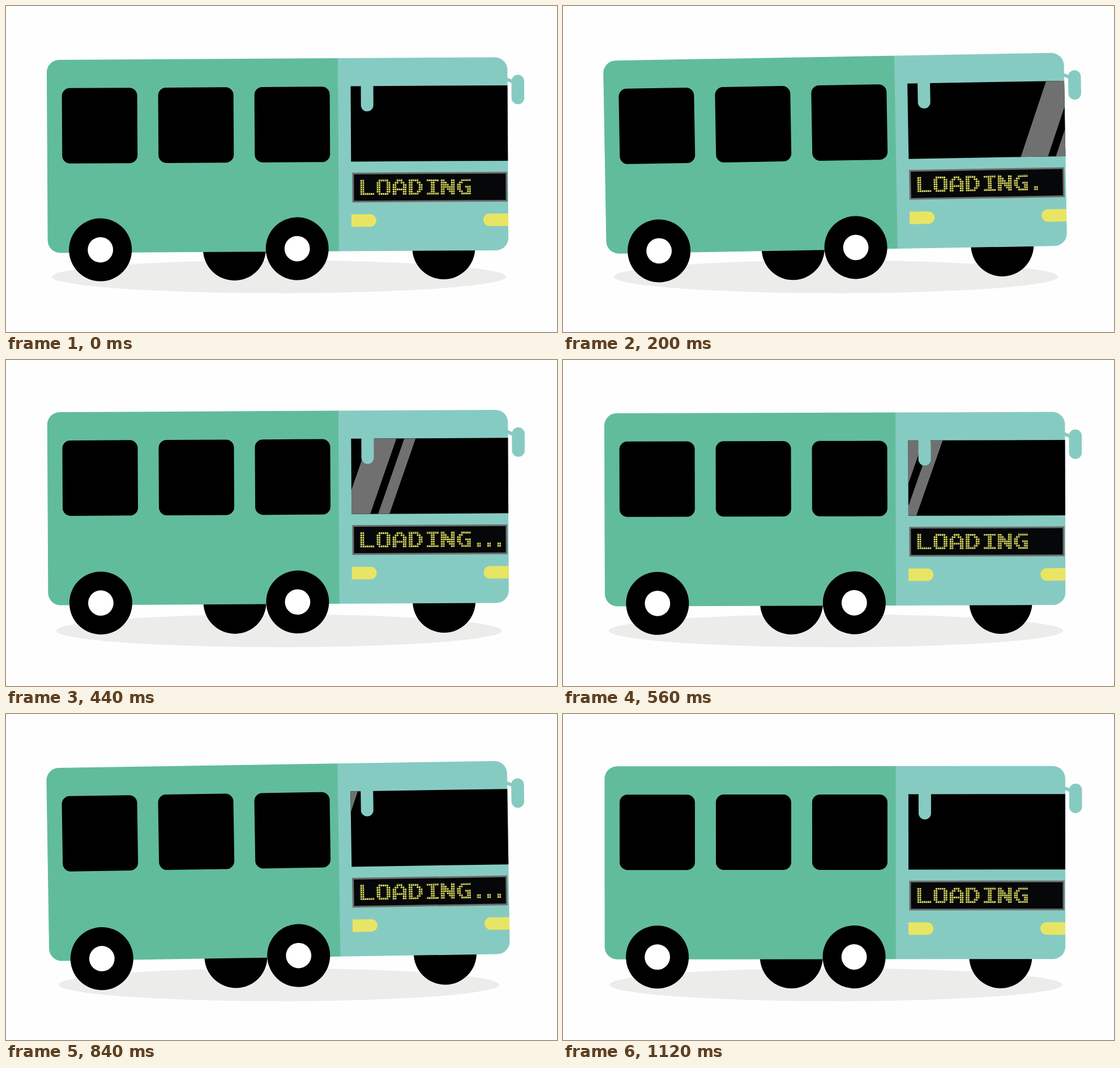
These frames come from a looping animation (973 by 575 pixels, 1.16 s). An HTML page:

```html
<!DOCTYPE html>
<html lang="en">
<head>
<meta charset="utf-8">
<title>Loading bus</title>
<style>
  html, body { margin: 0; height: 100%; overflow: hidden; background: #fefefe; }
  svg { display: block; width: 100vw; height: 100vh; }
  .dark { fill: #61bc9c; }
  .pale { fill: #86cbc2; }
  .lamp { fill: #e9e564; }
</style>
</head>
<body>
<svg viewBox="0 0 973 575" role="img" aria-label="LOADING">
  <defs>
    <clipPath id="shell"><rect x="73.5" y="92" width="813.5" height="340.5" rx="22"/></clipPath>
    <clipPath id="screen"><rect x="610" y="141.5" width="277" height="133"/></clipPath>
    <pattern id="grid" width="1" height="1" patternUnits="userSpaceOnUse">
      <path d="M0 0h1v.24h-.76v.76h-.24z" fill="#050709"/>
    </pattern>
  </defs>

  <ellipse id="shadow" cx="482" cy="477.5" rx="402" ry="29" fill="#ececeb"/>

  <g class="wheels">
    <circle cx="403.2" cy="428.5" r="55.5"/>
    <circle cx="772.7" cy="428.5" r="55.5"/>
  </g>

  <g id="bus">
    <g clip-path="url(#shell)">
      <path class="dark" d="M73 91h516v343h-516z"/>
      <path class="pale" d="M587.7 91h300v343h-300z"/>
    </g>
    <g id="windows"></g>
    <path d="M610 141.5h277v133h-277z"/>
    <g clip-path="url(#screen)">
      <path id="glare" fill="#707070" d="M-82 0h48l-47 133h-48zM-20 0h20l-47 133h-20z"/>
    </g>
    <path class="pale" d="M628 140h22v35a11 11 0 0 1-22 0z"/>
    <path d="M884 130l14 6" stroke="#86cbc2" stroke-width="6"/>
    <rect class="pale" x="894" y="123" width="22.5" height="52" rx="11.2"/>
    <path class="lamp" d="M610 367.5h33a11 11 0 0 1 0 22h-33z"/>
    <path class="lamp" d="M887 367.5h-33a11 11 0 0 0 0 22h33z"/>

    <g id="sign">
      <rect x="613" y="295.5" width="271" height="49.5" fill="#050709" stroke="#6b6c6d" stroke-width="3"/>
      <g transform="translate(625.5 306) scale(3.55 3.9)">
        <g id="letters" fill="#e9e564" fill-rule="evenodd"></g>
        <rect width="72" height="7" fill="url(#grid)"/>
      </g>
    </g>
  </g>

  <g class="wheels" id="near"></g>
</svg>

<script>
const LOOP = 1160, BOUNCE = 580, STEP = 40;
const $ = id => document.getElementById(id);

function add(parent, tag, attrs) {
  const el = document.createElementNS('http://www.w3.org/2000/svg', tag);
  for (const k in attrs) el.setAttribute(k, attrs[k]);
  return $(parent).appendChild(el);
}

for (const x of [100, 270, 440])
  add('windows', 'rect', { x, y: 142, width: 133, height: 133, rx: 14 });

for (const cx of [166.5, 514]) {
  add('near', 'circle', { cx, cy: 428.5, r: 55.5 });
  add('near', 'circle', { cx, cy: 428.5, r: 22.4, fill: '#fff' });
}

// Letter outlines on a 7 by 7 grid: L O A D I N G
[
  'M0 0h2v6h5v1h-7z',
  'M1 0h5v1h1v5h-1v1h-5v-1h-1v-5h1zM2 1h3v5h-3z',
  'M2 0h3v1h1v1h1v5h-2v-2h-3v2h-2v-5h1v-1h1zM3 1h1v1h1v2h-3v-2h1z',
  'M0 0h5v1h1v1h1v3h-1v1h-1v1h-5zM2 1h2v1h1v3h-1v1h-2z',
  'M1 0h6v1h-2v5h2v1h-6v-1h2v-5h-2z',
  'M0 0h2v1h1v1h1v1h1v-3h2v7h-2v-1h-1v-1h-1v-1h-1v3h-2z',
  'M2 0h5v1h-4v1h-1v3h1v1h2v-2h-1v-1h3v4h-5v-1h-1v-1h-1v-3h1v-1h1z'
].forEach((d, i) => add('letters', 'path', { d, transform: `translate(${i * 8})` }));

const dots = [58, 63, 68].map(x => add('letters', 'path', { d: `M${x} 5h2v2h-2z` }));

// Tracks are [time, value] pairs joined by straight lines
const tilt = [[0, .33], [140, .72], [215, 1.06], [380, .46], [440, .3], [535, 0], [560, .17], [580, .33]];
const bodyLift = [[0, -.75], [140, .75], [200, 2.5], [290, 3.2], [380, 3], [440, 2], [540, 0], [560, -.75], [580, -.75]];
const wheelLift = [[0, .25], [140, 1.25], [200, 2], [380, 1.75], [440, 1.5], [540, 0], [580, .25]];
const sway = [[0, -.8], [100, 0], [555, 0], [580, -.8]];
const glareX = [[0, 1020], [120, 985], [200, 937], [320, 822], [380, 768], [440, 724], [500, 695],
  [560, 671], [640, 652], [720, 637], [840, 623], [960, 614], [1120, 606], [1160, 600]];

function at(track, t) {
  const i = track.findIndex(k => k[0] > t);
  const [t0, a] = track[i - 1], [t1, b] = track[i];
  return a + (b - a) * (t - t0) / (t1 - t0);
}

function draw(t) {
  const p = t % BOUNCE;
  const angle = -at(tilt, p), dx = at(sway, p);
  const pose = lift => `translate(${dx} ${-lift}) rotate(${angle} 480 250)`;

  $('bus').setAttribute('transform', pose(at(bodyLift, p)));
  document.querySelectorAll('.wheels').forEach(w => w.setAttribute('transform', pose(at(wheelLift, p))));
  // the sign keeps its place sideways
  $('sign').setAttribute('transform', `translate(${70 * Math.sin(angle * Math.PI / 180) - dx})`);
  $('glare').setAttribute('transform', `translate(${at(glareX, t)} 141.5)`);
  $('shadow').setAttribute('rx', 401.5 - 13.5 * Math.sin(Math.PI * (p - 20) / BOUNCE) ** 2);

  const count = t < 960 ? Math.floor(t / 120) % 4 : 0;
  dots.forEach((d, i) => d.setAttribute('visibility', i < count ? 'visible' : 'hidden'));
}

const start = performance.now();
function tick() {
  const t = (performance.now() - start) % LOOP;
  draw(Math.floor(t / STEP) * STEP);
  requestAnimationFrame(tick);
}
tick();
</script>
</body>
</html>
```
